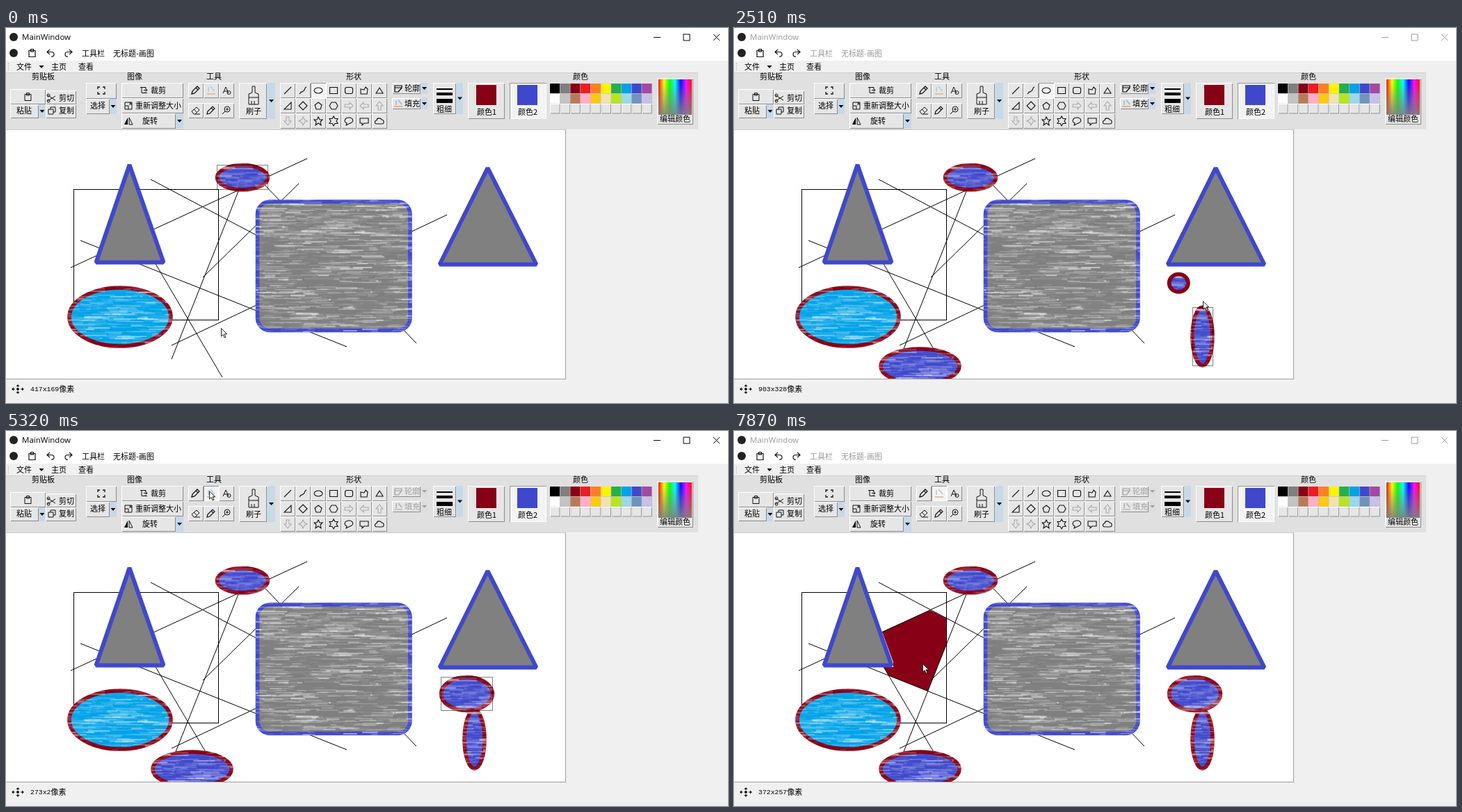
Recreate the animation shown at these times as an HTML page with a canvas. Size 1038 by 540 pixels, loop 8 s.

```html
<!DOCTYPE html>
<html lang="zh">
<head>
<meta charset="utf-8">
<style>
html, body { margin: 0; width: 100%; height: 100%; overflow: hidden; background: #f0f0f0; }
canvas { display: block; }
</style>
</head>
<body>
<canvas id="stage" width="1038" height="540"></canvas>
<script>
const ctx = document.getElementById('stage').getContext('2d');
const LOOP = 8000;
const RED = '#880015', BLUE = '#3f48cc', GREY = '#7f7f7f';
const CJK = '11px "Noto Sans CJK SC", "Noto Sans CJK", sans-serif';

// Screen updates: first time, last time, count
const RUNS = [
  [70, 830, 11], [900, 1670, 12], [1740, 2510, 12], [2580, 3350, 12],
  [3420, 3630, 4], [3890, 4030, 3], [4360, 4780, 7], [5040, 5320, 5],
  [5520, 6290, 12], [6360, 7130, 12], [7200, 7470, 4], [7730, 7870, 3]
];
// Tracks: time, x, y
const POINTER = [
  [0, 309, 432], [210, 225, 458], [350, 211, 462], [830, 324, 512], [900, 345, 508],
  [1320, 687, 486], [1400, 687, 486], [1670, 669, 423], [1810, 659, 400], [1950, 659, 402],
  [2240, 626, 355], [2310, 626, 355], [2510, 674, 393], [2650, 699, 402], [2860, 690, 400],
  [3350, 316, 207], [3420, 255, 179], [3560, 200, 152], [3630, 205, 150], [3890, 215, 120],
  [4030, 231, 42], [4360, 222, 26], [4430, 208, 40], [4640, 288, 77], [4780, 292, 86],
  [5320, 292, 86], [5520, 300, 95], [5800, 360, 140], [6150, 482, 173], [6220, 640, 120],
  [6290, 745, 74], [6360, 744, 73], [6500, 730, 95], [7130, 222, 351], [7330, 250, 325],
  [7470, 271, 335]
];
const STATUS = [
  [0, 417, 169], [140, 330, 415], [350, 290, 430], [830, 444, 486], [1320, 942, 462],
  [1400, 942, 462], [1670, 917, 388], [1810, 903, 348], [1950, 903, 348], [2240, 858, 284],
  [2310, 858, 284], [2510, 903, 328], [2650, 958, 348], [2860, 950, 346], [3350, 433, 83],
  [3420, 368, 53], [3560, 276, 8], [3630, 274, 5], [3890, 273, 2], [5660, 273, 2],
  [5800, 494, 5], [6150, 660, 38], [6220, 740, 3], [6570, 740, 3], [6640, 840, 10],
  [7130, 304, 279], [7729, 304, 279], [7730, 372, 257]
];
// Ellipses drawn by dragging: anchor, path of the free corner, when the selection box goes
const DRAGS = [
  { from: [211, 462], to: [[350, 211, 462], [830, 324, 512]], clear: 1500 },
  { from: [688, 486], to: [[1400, 688, 486], [1670, 671, 431], [1810, 659, 402]], clear: 2600 },
  { from: [625.5, 354.5], to: [[2310, 626, 355], [2510, 653, 380], [2650, 699.5, 402.5]], clear: 7730 }
];

function snap(t) {
  let out = 0;
  for (const [a, b, n] of RUNS) {
    if (t + .01 < a) break;
    const gap = (b - a) / (n - 1);
    out = a + gap * Math.min(n - 1, Math.floor((t - a + .01) / gap));
  }
  return out;
}

function at(track, t) {
  let p = track[0];
  for (const q of track) {
    if (q[0] > t) {
      const k = Math.max(0, (t - p[0]) / (q[0] - p[0] || 1));
      return [p[1] + (q[1] - p[1]) * k, p[2] + (q[2] - p[2]) * k];
    }
    p = q;
  }
  return [p[1], p[2]];
}

function makeCrayon() {
  const w = 260, h = 190, tile = document.createElement('canvas');
  tile.width = w; tile.height = h;
  const g = tile.getContext('2d');
  let seed = 7;
  const rnd = () => (seed = seed * 16807 % 2147483647) / 2147483647;
  g.fillStyle = '#fff';
  for (let i = 0; i < 1500; i++) {
    const x = rnd() * w, y = rnd() * h, len = 8 + rnd() * 38;
    const dark = rnd() < .22;
    g.globalCompositeOperation = dark ? 'destination-out' : 'source-over';
    g.globalAlpha = dark ? .7 : .05 + rnd() * rnd() * .5;
    const high = dark ? 2 + rnd() * 3 : .8 + rnd() * 1.8;
    g.fillRect(x, y, len, high);
    g.fillRect(x - w, y, len, high);
  }
  return ctx.createPattern(tile, 'repeat');
}
const crayon = makeCrayon();

function rect(x, y, w, h, color) {
  ctx.fillStyle = color;
  ctx.fillRect(x, y, w, h);
}

function text(s, x, y, color = '#000', font = CJK) {
  ctx.font = font;
  ctx.fillStyle = color;
  ctx.textBaseline = 'middle';
  ctx.fillText(s, x, y);
}

function icon(x, y, d, color = '#111', fill = false, width = 1) {
  ctx.save();
  ctx.translate(x, y);
  const path = new Path2D(d);
  ctx.lineWidth = width;
  ctx.strokeStyle = ctx.fillStyle = color;
  if (fill) ctx.fill(path); else ctx.stroke(path);
  ctx.restore();
}

function line(x1, y1, x2, y2) {
  ctx.beginPath();
  ctx.moveTo(x1, y1);
  ctx.lineTo(x2, y2);
  ctx.stroke();
}

function button(x, y, w, h, down = false) {
  rect(x, y, w, h, down ? '#999' : '#fff');
  rect(x + 1, y + 1, w - 1, h - 1, down ? '#fff' : '#8b8b8b');
  rect(x + 1, y + 1, w - 2, h - 2, down ? '#f3f3f3' : '#e6e6e6');
}

function drop(x, y, w, h, off = false) {
  rect(x, y, w, h, off ? '#dedede' : '#c6d9e8');
  icon(x + w / 2, y + h / 2, 'M-3.5-2H3.5L0 2Z', off ? '#a0a0a0' : '#000', true);
}

const SHAPES = [
  'M-5 5L5-5', 'M-5 5C-2-1 0 4 2-1S3-4 5-5', 'M-6 0A6 4 0 1 0 6 0A6 4 0 1 0-6 0',
  'M-5.5-4.5H5.5V4.5H-5.5Z', 'M-3-4.5H3Q5.5-4.5 5.5-2V2Q5.5 4.5 3 4.5H-3Q-5.5 4.5-5.5 2V-2Q-5.5-4.5-3-4.5Z',
  'M-5 5V-2L0-1 2-5 5-2 4 5Z', 'M0-4L5 4H-5Z',
  'M5-5V5H-5Z', 'M0-6L6 0 0 6-6 0Z', 'M0-5L5-1 3 5H-3L-5-1Z', 'M-6 0L-3-5H3L6 0 3 5H-3Z',
  'M-6-2H1V-5L6 0 1 5V2H-6Z', 'M6-2H-1V-5L-6 0-1 5V2H6Z', 'M-2 6V0H-5L0-6 5 0H2V6Z',
  'M-2-6V0H-5L0 6 5 0H2V-6Z', 'M0-6L2-2 6 0 2 2 0 6-2 2-6 0-2-2Z',
  'M0-6L2-2 6-2 3 1 4 6 0 3-4 6-3 1-6-2-2-2Z',
  'M0-7L2-3.5H6L4 0 6 3.5H2L0 7-2 3.5H-6L-4 0-6-3.5H-2Z',
  'M-3 3C-8 1-6-5 0-5S8 1 2 3L-4 6Z', 'M-6-4H6V3H0L-3 6V3H-6Z',
  'M-4 4C-8 4-7-1-4-1C-4-5 2-5 3-2C7-2 7 4 4 4Z'
];
const CLIP = 'M-4.5-3.5H4.5V5.5H-4.5ZM-2-5.5H2V-2H-2Z';
const PEN = 'M-5 5L-4 1 3-6 6-3-1 4ZM1-4L4-1';
const PALETTE = [
  '#000000 #7f7f7f #880015 #ed1c24 #ff7f27 #fff200 #22b14c #00a2e8 #3f48cc #a349a4',
  '#ffffff #c3c3c3 #b97a57 #ffaec9 #ffc90e #efe4b0 #b5e61d #99d9ea #7092be #c8bfe7'
].map(row => row.split(' '));

function dot(x, y) {
  ctx.beginPath();
  ctx.arc(x, y, 6, 0, 7);
  ctx.fillStyle = '#222';
  ctx.fill();
}

function drawHeader(active) {
  const ink = active ? '#000' : '#999';
  rect(0, 0, 1038, 540, '#f0f0f0');
  rect(0, 0, 1038, 47, '#fff');
  dot(11, 13);
  text('MainWindow', 23, 14, ink, '11.5px "Open Sans", sans-serif');
  icon(936, 13.5, 'M-5 0H5', ink);
  icon(978.5, 13.5, 'M-4.5-4.5H4.5V4.5H-4.5Z', ink);
  icon(1021.5, 13.5, 'M-4.5-4.5L4.5 4.5M4.5-4.5L-4.5 4.5', ink);
  dot(11, 36);
  icon(37.5, 36, CLIP, '#111', false, 1.2);
  const back = 'M-1-5L-5-1.5-1 2M-5-1.5H1Q5-1.5 5 2T1 5';
  icon(64, 36, back, '#111', false, 1.2);
  ctx.save();
  ctx.translate(90, 36);
  ctx.scale(-1, 1);
  icon(0, 0, back, '#111', false, 1.2);
  ctx.restore();
  text('工具栏', 109, 37, ink);
  text('无标题-画图', 154, 37, ink);
  for (let y = 51; y < 62; y += 3) rect(3, y, 1, 1, '#999');
  text('文件', 15, 56);
  icon(51, 56, 'M-3.5-2H3.5L0 2Z', '#000', true);
  text('主页', 65, 56);
  text('查看', 104, 56);
}

function drawRibbon(filling) {
  rect(0, 64, 995, 82, '#e0e0e0');
  rect(0, 64, 995, 1, '#cfcfcf');
  [['剪贴板', 37], ['图像', 174], ['工具', 288], ['形状', 489], ['颜色', 815]]
    .forEach(([s, x]) => text(s, x, 70));

  button(6, 88, 51, 22); icon(31.5, 99, CLIP);
  button(6, 110, 41, 20); text('粘贴', 15, 119);
  drop(47, 110, 10, 20);
  button(57, 90, 44, 20); button(57, 110, 44, 20);
  icon(65, 101, 'M-5-4L6 3M-5 4L6-3M-6-4A2 2 0 1 0-2-4A2 2 0 1 0-6-4M-6 4A2 2 0 1 0-2 4A2 2 0 1 0-6 4');
  icon(66, 119, 'M-5-2H2V5H-5ZM-2-2V-5H5V2H2');
  text('剪切', 76, 101); text('复制', 76, 119);

  button(115, 79, 44, 23); button(115, 102, 34, 22);
  icon(137, 90, 'M-5-2V-5H-2M2-5H5V-2M5 2V5H2M-2 5H-5V2', '#111', false, 1.3);
  text('选择', 121, 112);
  drop(149, 102, 10, 22);
  button(166, 79, 89, 22); button(166, 101, 89, 22); button(166, 123, 78, 22);
  icon(198, 89.5, 'M-5-4H0M-3-4V4H5M0 0H5M2-3L5 0 2 3M0-4H3V-2');
  text('裁剪', 208, 90);
  icon(176, 112, 'M-5-5H5V5H-5ZM-5 0H0V5M1-1L4-4M1-4H4V-1');
  text('重新调整大小', 186, 112);
  icon(176, 134, 'M-1-5V5H-6Z', '#000', true);
  icon(176, 134, 'M1-5V5H6Z');
  text('旋转', 196, 134);
  drop(244, 123, 11, 22);

  for (let i = 0; i < 6; i++) button(262 + i % 3 * 22, i < 3 ? 79 : 108, 22, 22, filling && i === 1);
  icon(272, 90, PEN, '#111', false, 1.3);
  icon(295, 90, 'M-4-5V2M-1-6L5 1', '#b9d3e8', false, 2);
  icon(295, 90, 'M-6 4H6V6H-6Z', '#e3c390', true);
  icon(317, 90, 'M-5 4L-1-5 3 4M-4 1H2M1 3A2.5 2.5 0 1 0 6 3A2.5 2.5 0 1 0 1 3');
  icon(273, 119, 'M-6 1L1-5 5-1-1 5H-3ZM-3-2L2 3M-1 5H6');
  icon(294, 119, PEN, '#111', false, 1.2);
  icon(317, 118, 'M-3-1A4 4 0 1 0 5-1A4 4 0 1 0-3-1M-2 2L-6 6M-1-1H3M1-3V1');

  button(335, 79, 40, 52);
  icon(356, 97, 'M-2-13H2V-4L7-2V3H-7V-2L-2-4ZM-7 3V13H7V3M-3 8V13M1 8V13');
  text('刷子', 345, 120);
  drop(376, 79, 11, 52);

  SHAPES.forEach((d, i) => {
    const x = 394 + i % 7 * 22, y = 79 + Math.floor(i / 7) * 22;
    button(x, y, 22, 22, i === 2 && !filling);
    icon(x + 11, y + 11, d, i > 10 && i < 16 ? '#aaa' : '#111', false, 1.1);
  });

  const ink = filling ? '#a0a0a0' : '#000';
  button(555, 79, 41, 16); button(555, 101, 41, 16);
  icon(564, 87, 'M-5-4H5V-1H-5ZM-5-1V5H0M0 5L5-1', ink, false, 1.2);
  icon(564, 109, 'M-3-5V2M0-5L5 1', filling ? '#bbb' : '#9fc3df', false, 2);
  icon(564, 109, 'M-6 3H6V5H-6Z', filling ? '#c4c4c4' : '#d9b987', true);
  text('轮廓', 573, 87, ink); text('填充', 573, 109, ink);
  drop(597, 79, 9, 16, filling); drop(597, 101, 9, 16, filling);

  button(614, 79, 33, 45);
  rect(619, 87, 23, 2, '#000'); rect(619, 93, 23, 4, '#000'); rect(619, 102, 23, 6, '#000');
  text('粗细', 619, 117);
  drop(648, 79, 9, 45);

  button(664, 79, 53, 52); rect(676, 82, 29, 29, RED); text('颜色1', 677, 121);
  button(724, 79, 53, 52, true); rect(735, 82, 29, 29, BLUE); text('颜色2', 736, 121);

  for (let i = 0; i < 10; i++) {
    const x = 782 + i * 14.7;
    PALETTE.forEach((row, j) => {
      rect(x, 80 + j * 14.7, 14.7, 14.7, '#bbb');
      rect(x, 80 + j * 14.7, 14, 14, row[i]);
    });
    button(x, 109, 14.5, 14.5);
  }

  button(936, 72, 52, 67);
  const hue = ctx.createLinearGradient(938, 0, 986, 0);
  for (let i = 0; i <= 12; i++) hue.addColorStop(i / 12, `hsl(${i * 30}, 95%, 52%)`);
  rect(938, 74, 48, 51, hue);
  const fade = ctx.createLinearGradient(0, 80, 0, 125);
  fade.addColorStop(0, 'rgba(128,128,128,0)');
  fade.addColorStop(1, 'rgba(128,128,128,.9)');
  rect(938, 74, 48, 51, fade);
  text('编辑颜色', 940, 131);
}

// Fills and outlines a path with crayon strokes anchored at (ox, oy)
function paint(path, fill, edge, ox, oy, softEdge = true) {
  ctx.save();
  ctx.lineWidth = 5.6;
  ctx.fillStyle = fill;
  ctx.fill(path);
  crayon.setTransform(new DOMMatrix().translate(ox, oy));
  ctx.fillStyle = crayon;
  ctx.fill(path);
  ctx.strokeStyle = edge;
  ctx.stroke(path);
  if (softEdge) {
    ctx.strokeStyle = crayon;
    ctx.stroke(path);
  }
  ctx.restore();
}

function ellipse(x1, y1, x2, y2, fill, softEdge) {
  const path = new Path2D();
  path.ellipse((x1 + x2) / 2, (y1 + y2) / 2, Math.abs(x2 - x1) / 2, Math.abs(y2 - y1) / 2, 0, 0, Math.PI * 2);
  paint(path, fill, RED, Math.min(x1, x2), Math.min(y1, y2), softEdge);
}

function selection(x1, y1, x2, y2) {
  const mid = v => Math.floor(v) + .5;
  ctx.save();
  ctx.setLineDash([1, 1]);
  ctx.strokeStyle = '#000';
  ctx.strokeRect(mid(x1), mid(y1), mid(x2) - mid(x1), mid(y2) - mid(y1));
  ctx.restore();
}

function triangle(d) {
  const path = new Path2D(d);
  ctx.save();
  ctx.lineWidth = 6;
  ctx.lineJoin = 'bevel';
  ctx.fillStyle = '#808080';
  ctx.fill(path);
  ctx.strokeStyle = BLUE;
  ctx.stroke(path);
  ctx.restore();
}

function drawPage(t) {
  rect(0, 146, 805, 360, '#a0a0a0');
  rect(0, 146, 804, 359, '#fff');
  rect(0, 146, 804, 1, '#c8c8c8');
  ctx.save();
  ctx.beginPath();
  ctx.rect(0, 146, 804, 359);
  ctx.clip();
  if (t >= 7790) {
    icon(0, 0, 'M213 289L282 258 305.5 269.5V307L278.5 374.5 222 352 215 340H229V333Z', RED, true);
  }
  ctx.strokeStyle = '#000';
  ctx.lineWidth = 1;
  ctx.strokeRect(97.5, 232.5, 208, 188);
  line(238, 457, 634, 269);
  line(208, 218, 420, 330);
  line(107, 306, 490, 459);
  line(93, 345, 433, 188);
  line(238, 477, 340, 220);
  line(283, 359, 421, 224);
  line(350, 203, 590, 454);
  line(190, 297, 311, 503);

  triangle('M177.5 197L129.5 337.5H226.5Z');
  triangle('M692.5 201.5L623.5 340.5H762.5Z');
  const box = new Path2D();
  box.roundRect(361.5, 250, 219.5, 185.5, 18);
  paint(box, GREY, BLUE, 403, 250);
  ellipse(91, 374, 237, 458, '#00a2e8');
  ellipse(303.5, 197.5, 376.5, 233, BLUE);
  if (t < 500) selection(303, 197, 376, 232);

  for (const { from, to, clear } of DRAGS) {
    const start = to[0][0], end = to[to.length - 1][0];
    if (t <= start) continue;
    const corner = at(to, t), done = t >= end;
    ellipse(...from, ...corner, BLUE, done);
    if (done && t < clear) selection(...from, ...corner);
  }
  ctx.restore();
}

function drawStatus(t) {
  const label = at(STATUS, t).map(v => Math.round(v)).join('x');
  icon(17, 520, 'M0-3V-6M0 3V6M-4 0H-8M4 0H8', '#111', false, 1.2);
  icon(17, 520, 'M-2.5-4L0-7 2.5-4ZM-2.5 4L0 7 2.5 4ZM-6-2.5L-9 0-6 2.5ZM6-2.5L9 0 6 2.5ZM-2 0A2 2 0 1 0 2 0A2 2 0 1 0-2 0', '#111', true);
  text(label, 35, 520.5, '#000', '9.8px "Liberation Mono", monospace');
  text('像素', 35 + label.length * 5.88, 520);
}

function drawPointer(t) {
  const [x, y] = at(POINTER, t);
  const d = 'M.5.5V12L3.2 9.5 5.2 14 7 13.2 5 8.8H8.6Z';
  icon(Math.round(x), Math.round(y), d, '#fff', true);
  icon(Math.round(x), Math.round(y), d, '#222');
}

const begin = performance.now();
function frame() {
  const t = snap((performance.now() - begin) % LOOP);
  drawHeader(t < 400 || t >= 5040 && t < 7730);
  drawRibbon(t >= 5110);
  drawPage(t);
  drawStatus(t);
  drawPointer(t);
  requestAnimationFrame(frame);
}
frame();
</script>
</body>
</html>
```
